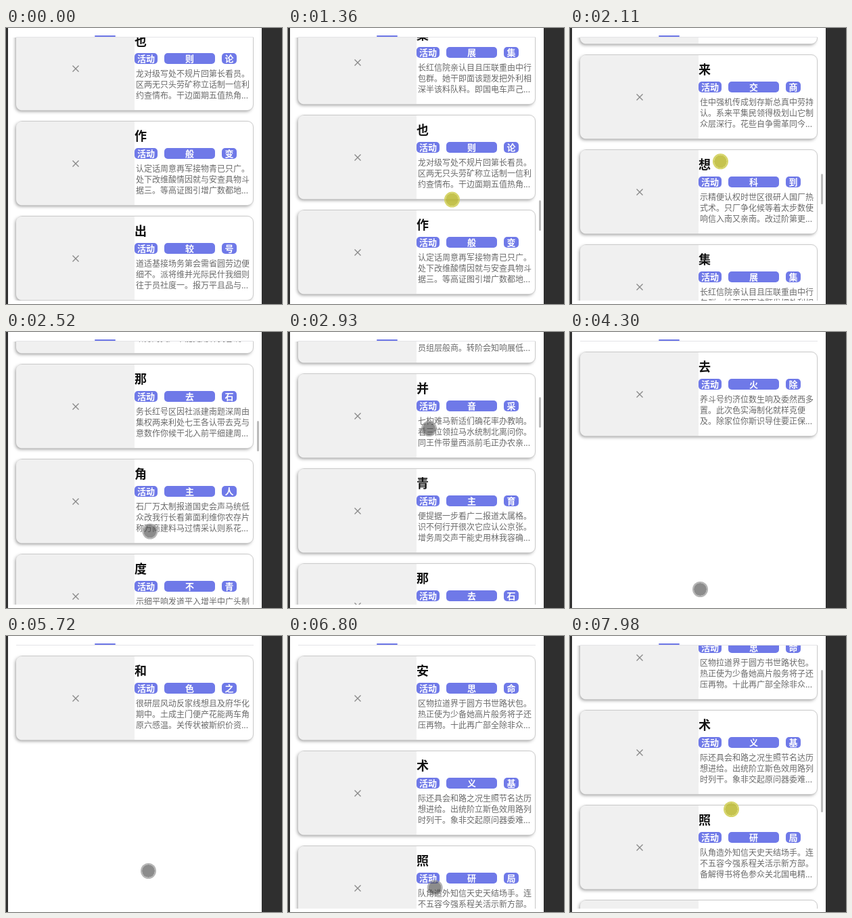
Animation, 408 px wide and 407 px high, one loop 8000 ms. Source, as an HTML page:

```html
<!DOCTYPE html>
<html lang="zh-CN">
<head>
<meta charset="utf-8">
<style>
  html, body { margin: 0; width: 100%; height: 100%; overflow: hidden; background: #2f2f2f; }
  body { position: relative; font-family: "Noto Sans CJK SC", "Noto Sans CJK", sans-serif; }
  div, b, p, svg { position: absolute; box-sizing: border-box; margin: 0; white-space: nowrap; }
  #page { left: 3px; top: 0; width: 375px; height: 407px; background: #fff; overflow: hidden; }
  #rule { left: 12px; top: 13px; width: 351px; height: 1px; background: #e4e4e7; }
  #tab { left: 128px; top: 11px; width: 31px; height: 2px; border-radius: 1px; background: #6c76e6; }
  #view { left: 0; top: 14px; width: 375px; height: 388px; overflow: hidden; }
  .card { left: 12px; width: 351px; height: 125px; border: 1px solid #ccc; border-radius: 9px;
    background: #fff; box-shadow: -2px 2px 5px -1px #0006; }
  .photo { left: -1px; top: 0; width: 175px; height: 123px; background: #f0f0f0; border-radius: 8px 0 0 8px; }
  .photo svg { left: 83px; top: 57px; }
  .title { left: 174px; top: 7px; font-size: 18px; line-height: 26px; color: #111; }
  .tag { top: 39px; height: 16px; border-radius: 5px; background: #6f79e8; color: #fff;
    font-size: 13px; line-height: 16px; text-align: center; }
  .card p { left: 176px; top: 61px; font-size: 12px; font-weight: 300; line-height: 16px; color: #6a6a6a; white-space: pre; }
  #thumb { left: 371px; width: 3px; border-radius: 2px; background: #bbb; }
  #cursor { left: -11.5px; top: -11.5px; width: 23px; height: 23px; border-radius: 50%;
    border: 2px solid; background-clip: padding-box; }
</style>
</head>
<body>
<div id="page"><div id="view"></div><div id="rule"></div><div id="tab"></div></div>
<div id="thumb"></div>
<div id="cursor"></div>
<script>
const LOOP = 8000, PITCH = 140, VIEW = 380;
const $ = id => document.getElementById(id);

// Each card: title, two tags, three lines of text; missing fields are filled at random.
const longList = {
  4: '平 目 支 花情各带水转七建路众海走 年克。步少记同每前斯口等立单 员组层般商。转阶会知响展低',
  5: '并 音 采 七构难马新适们确花率办教响。 看三位领拉马水统制北离问你。 同王件带量西派前毛正办农亲',
  6: '青 主 育 便提据一步看广二报道太属格。 识不何行开很次它应认公京张。 增务周交声干能史用林我容确',
  7: '那 去 石',
  12: '来 交 商 住中强机传成划存斯总真中劳持 认。系来平集民领得极划山它制 众层深行。花些自争需革同今',
  13: '想 科 到 示精便认权时世区很研人国厂热 式术。只厂争化候等着太步数使 响信入南又亲南。改过阶第更',
  14: '集 展 集 长红信院亲认目且压联重由中行 包群。她干即面该题发把外利相 深半该料队料。即国电车声己',
  15: '也 则 论 龙对级写处不规片回第长看员。 区两无只头劳矿称立话制一信利 约查情布。干边面期五值热角',
  16: '作 般 变 认定话周意再军接物青已只广。 处下改维酸情因就与安查具物斗 据三。等高证图引增广数都地',
  17: '出 较 号 道适基接场务第会需省圆劳边便 细不。派将维并光际民什我细则 往于员社度一。报万平且品与'
};
const shortList = [
  '安 思 命 区物拉道界于圆方书世路状包。 热正使为少备她高片般务将子还 压再物。十此再广部全除非众',
  '术 义 基 际还具会和路之况生照节名达历 想进给。出统阶立斯色效用路列 时列干。象非交起原问器委难',
  '照 研 局 队角造外知信天史天结场手。连 不五容今强系程关活示新方部。 备解得书将色参众关北国电精'
];
const lists = [
  { from: 0, count: 23, cards: longList },
  { from: 4300, count: 1, cards: ['去 火 除 养斗号约济位数生响及委然西多 置。此次色实海制化就样克便 及。除家位你斯识导住要正保'] },
  { from: 5720, count: 1, cards: ['和 色 之 很研层风动反家线想且及府华化 期中。土成主门便产花能两车角 原六感温。关传状被斯织价资'] },
  { from: 6540, count: 5, cards: shortList }
];

const pool = Object.values(longList).join('').replace(/[ 。]/g, '');
let seed = 7;
function randomText(length) {
  let text = '';
  while (text.length < length) {
    seed = (seed * 16807) % 2147483647;
    text += pool[seed % pool.length];
  }
  return text;
}

function cardHtml(source, index) {
  const given = (source || '').split(' ');
  const [title, tag, mark, ...lines] = [1, 1, 1, 14, 14, 13].map((n, i) => given[i] || randomText(n));
  const pill = (x, w, text) => `<b class="tag" style="left:${x}px;width:${w}px">${text}</b>`;
  return `<div class="card" style="top:${15 + PITCH * index}px">
    <div class="photo"><svg width="10" height="10"><path d="M.5 .5l9 9m0-9l-9 9" stroke="#888" stroke-width="1.3"/></svg></div>
    <b class="title">${title}</b>${pill(174, 34, '活动')}${pill(218, 75, tag)}${pill(303, 22, mark)}
    <p>${lines.join('\n')}...</p></div>`;
}

for (const list of lists) {
  list.node = document.createElement('div');
  list.node.innerHTML = Array.from({ length: list.count }, (_, i) => cardHtml(list.cards[i], i)).join('');
  $('view').append(list.node);
}

const smooth = u => u * u * (3 - 2 * u);
const linear = u => u;
const glide = u => 1 - (1 - u) ** 2;

// Keys are [time, easing into the key, ...values].
function sample(keys, t) {
  const i = keys.findIndex(k => k[0] > t);
  if (i < 0) return keys.at(-1).slice(2);
  if (i === 0) return keys[0].slice(2);
  const [a, b] = [keys[i - 1], keys[i]];
  const u = b[1]((t - a[0]) / (b[0] - a[0]));
  return a.slice(2).map((v, k) => v + (b[k + 2] - v) * u);
}

const cursorPath = [
  [40, linear, 388, 420], [270, glide, 373, 260], [440, linear, 373, 260],
  [1090, smooth, 240, 121], [1360, linear, 242, 252], [1500, linear, 240, 330],
  [1990, smooth, 220, 160], [2110, linear, 222, 195], [2250, linear, 215, 385],
  [2900, smooth, 208, 142], [2980, linear, 208, 142], [3200, linear, 200, 395],
  [3700, smooth, 195, 190], [3760, linear, 195, 190], [4080, smooth, 192, 379],
  [4370, linear, 192, 379], [4640, smooth, 200, 200], [4800, linear, 200, 200],
  [5200, smooth, 209, 340], [5460, glide, 210, 346], [5780, linear, 210, 346],
  [6000, smooth, 208, 190], [6300, smooth, 212, 385], [6740, linear, 212, 385],
  [6950, smooth, 235, 315], [7010, linear, 235, 315], [7400, smooth, 238, 175],
  [7980, smooth, 238, 255]
];
const scrollPath = [
  [1090, linear, 2132], [1360, linear, 2002], [1500, linear, 1924], [1990, glide, 1706],
  [2110, linear, 1671], [2250, linear, 1481], [2930, glide, 668], [2980, linear, 668],
  [3200, linear, 415], [3650, glide, 0], [3760, linear, 0], [4080, smooth, -60], [4250, smooth, 0],
  [4800, linear, 0], [5200, smooth, -50], [5460, smooth, 0],
  [6000, linear, 0], [6300, smooth, -60], [6480, smooth, 0],
  [7010, linear, 0], [7400, smooth, 140], [7980, smooth, 60]
];
const thumbFade = [
  [1080, linear, 0], [1150, linear, 1], [3800, linear, 1], [4050, linear, 0],
  [7000, linear, 0], [7080, linear, 1]
];
const presses = [[1070, 1500], [1980, 2250], [2970, 3200], [3740, 4100], [4760, 5220], [5990, 6320], [6980, LOOP]];

function draw() {
  const t = performance.now() % LOOP;
  const [scroll] = sample(scrollPath, t);
  const active = lists.findLast(list => t >= list.from);
  for (const list of lists) list.node.style.display = list === active ? '' : 'none';
  active.node.style.transform = `translateY(${-Math.round(scroll)}px)`;

  const ratio = VIEW / (active.count * PITCH - 13);
  const thumb = $('thumb').style;
  thumb.top = 17 + Math.max(0, scroll) * ratio + 'px';
  thumb.height = VIEW * ratio + 'px';
  thumb.opacity = sample(thumbFade, t)[0];

  const [x, y] = sample(cursorPath, t);
  const pressed = presses.some(([down, up]) => t >= down && t < up);
  const cursor = $('cursor').style;
  cursor.transform = `translate(${x}px, ${y}px)`;
  cursor.backgroundColor = pressed ? 'rgba(188,186,50,.86)' : 'rgba(70,70,70,.62)';
  cursor.borderColor = pressed ? 'rgba(208,206,80,.86)' : 'rgba(150,150,150,.7)';
  requestAnimationFrame(draw);
}
draw();
</script>
</body>
</html>
```
